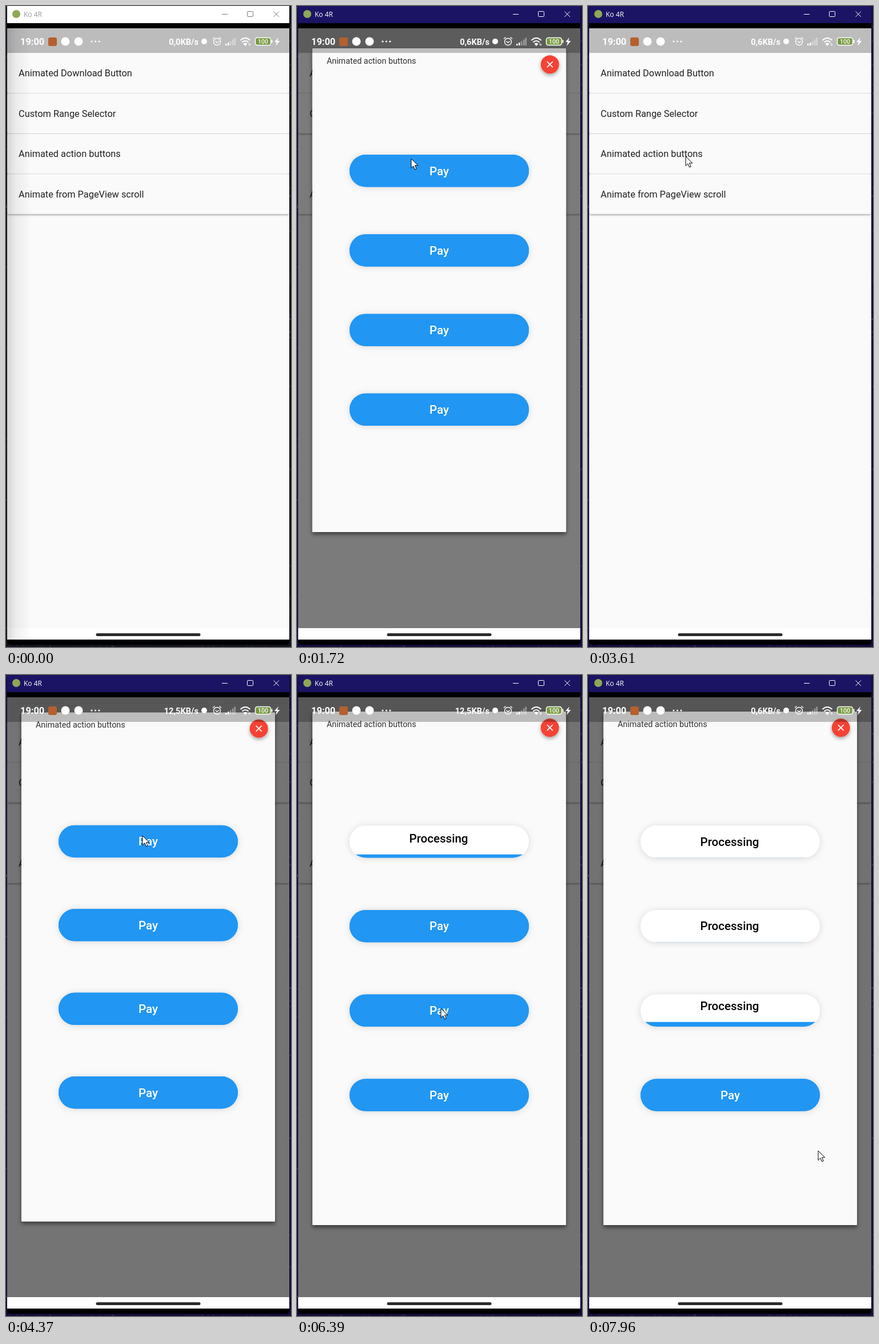
Animation of 499x1121 px, one loop 8000 ms. Source, as an HTML page:

```html
<!DOCTYPE html>
<html lang="en">
<head>
<meta charset="utf-8">
<title>Animated action buttons</title>
<style>
html, body { margin: 0; width: 100%; height: 100%; overflow: hidden; background: #0b0d16; }
svg { display: block; width: 499px; height: 1121px; }
text { font-family: Roboto, sans-serif; white-space: pre; }
.item { font-size: 16.34px; fill: #212121; }
.label { font-size: 20.5px; font-weight: 500; text-anchor: middle; }
</style>
</head>
<body>
<svg id="stage" viewBox="0 0 499 1121" xmlns="http://www.w3.org/2000/svg">
  <defs>
    <filter id="cardShadow" x="-5%" y="-30%" width="110%" height="170%">
      <feDropShadow dx="0" dy="2" stdDeviation="1.8" flood-color="#000" flood-opacity=".32"/>
    </filter>
    <filter id="panelShadow" x="-10%" y="-10%" width="120%" height="130%">
      <feDropShadow dx="0" dy="4" stdDeviation="3.5" flood-color="#000" flood-opacity=".5"/>
    </filter>
    <filter id="pillShadow" x="-15%" y="-50%" width="130%" height="200%">
      <feDropShadow dx="0" dy="1" stdDeviation="6" flood-color="#000" flood-opacity=".14"/>
    </filter>
    <filter id="fabShadow" x="-50%" y="-50%" width="200%" height="220%">
      <feDropShadow dx="0" dy="3" stdDeviation="3" flood-color="#000" flood-opacity=".35"/>
    </filter>
    <linearGradient id="edge">
      <stop offset="0" stop-color="#000" stop-opacity=".15"/>
      <stop offset=".35" stop-color="#000" stop-opacity=".06"/>
      <stop offset="1" stop-color="#000" stop-opacity="0"/>
    </linearGradient>
    <clipPath id="screen"><rect x="2" y="39" width="494" height="1069"/></clipPath>
    <clipPath id="panelClip"><rect id="panelCut"/></clipPath>
  </defs>

  <rect id="desk" width="499" height="1121"/>
  <g id="specks"></g>
  <path d="M2 0H496V1111q0 6-6 6H8q-6 0-6-6Z" fill="#000"/>

  <rect id="bar" x="2" y="0" width="494" height="30"/>
  <circle cx="18" cy="14" r="7" fill="#8fa854"/>
  <text id="barText" x="31" y="18.5" style="font:12px 'Open Sans',sans-serif">Ko 4R</text>
  <path id="barIcons" d="M378 14.5H388M423.5 9.5h8q1 0 1 1v7q0 1-1 1h-8q-1 0-1-1v-7q0-1 1-1ZM468.5 9.5l9.5 9.5m0-9.5l-9.5 9.5" fill="none"/>

  <g clip-path="url(#screen)">
    <rect x="2" y="39" width="494" height="1049" fill="#fafafa"/>
    <g id="cards"></g>
    <rect id="scrim" x="2" y="39" width="494" height="1049" fill="#000"/>
    <g id="panel">
      <rect id="panelBox" fill="#fafafa" filter="url(#panelShadow)"/>
      <g clip-path="url(#panelClip)">
        <text id="cardTitle" class="item">Animated action buttons</text>
        <g id="form">
          <text id="formTitle" style="font-size:14.32px" fill="#303030">Animated action buttons</text>
          <g id="pills"></g>
          <g id="close">
            <circle r="16" fill="#f44336" filter="url(#fabShadow)"/>
            <path d="M-5-5L5 5M5-5L-5 5" stroke="#fff" stroke-width="1.7"/>
          </g>
        </g>
      </g>
    </g>
    <rect x="2" y="1088" width="494" height="20" fill="#fff"/>
    <rect x="157.500" y="1097" width="183" height="5" rx="2.500" fill="#2c2c2c"/>
    <rect id="edgeShade" x="2" y="39" width="43" height="1069" fill="url(#edge)"/>

    <rect x="2" y="39" width="494" height="43" fill="#000" fill-opacity=".25"/>
    <g fill="#fff">
      <text x="25" y="68" font-size="16.4" font-weight="700">19:00</text>
      <rect x="74" y="55" width="15" height="15" rx="3" fill="#b5602f"/>
      <circle cx="104" cy="62" r="7.500"/>
      <circle cx="127" cy="62" r="7.500"/>
      <circle cx="150" cy="62" r="1.600"/><circle cx="156.500" cy="62" r="1.600"/><circle cx="163" cy="62" r="1.600"/>
      <text id="speed" x="337" y="67.500" font-size="14.6" font-weight="700" text-anchor="end"></text>
      <circle cx="347" cy="62" r="5"/>
      <g fill="none" stroke="#fff" stroke-width="1.400">
        <circle cx="369.500" cy="62.500" r="6"/>
        <path d="M366.500 61.500l3 2.500l3.500-2.500M362 57.500l3.500-3M377 57.500l-3.500-3"/>
      </g>
      <path d="M384 66h2.500v3H384ZM388 64h2.500v5H388Z"/>
      <path d="M392 61.500h2.500v7.500H392ZM396 58.500h2.500v10.500H396ZM399.500 55.500h2.500v13.500h-2.500Z" opacity=".4"/>
      <g fill="none" stroke="#fff" stroke-width="2">
        <path d="M410.500 60q8.500-8 17 0M413.500 63.500q5.500-5 11 0"/>
      </g>
      <path d="M415.500 66q3.500-3 7 0l-3.500 4ZM425 65h1v4h-1ZM427 66h1v3h-1Z"/>
      <rect x="436.500" y="55.500" width="27" height="13" rx="3.500" fill="#76983f" stroke="#fff" stroke-width="1.500"/>
      <path d="M464.500 59.500h2v5h-2Z"/>
      <text x="450" y="66" font-size="10.500" font-weight="500" text-anchor="middle">100</text>
      <path d="M477 55l-7 8h4l-2 7l7.500-9h-4.500Z"/>
    </g>
  </g>
  <path id="cursor" d="M0 0V16.500L3.800 12.800L6.600 19L9.200 17.900L6.500 11.800H11.700Z" fill="#fff" stroke="#000" stroke-width="1"/>
</svg>
<script>
const LOOP = 8000, FLIGHT = 500, SLIDE = 500;
const ACTIVE_AT = 1250;
const FLIGHTS = [[1372, 'open'], [2880, 'close'], [3935, 'open']];
const PRESSES = [5943, 6900, 7535, Infinity];
const SPEEDS = [[0, '0,0KB/s'], [1400, '0,6KB/s'], [3980, '12,5KB/s'], [7250, '0,6KB/s']];
const CARD = { l: 2, t: 223, r: 496, b: 294 };
const FORM = { l: 27, t: 64, r: 471, b: 962 };
const PILL_H = 56.5;

// time, x, y of the pointer tip
const PATH = [
  [580, 502, 520], [1000, 232, 300], [1250, 200, 267], [1760, 200, 267],
  [2250, 310, 190], [2700, 437, 104], [2900, 438, 106], [3060, 427, 165],
  [3480, 171, 263], [3960, 171, 263], [4370, 239, 281], [5950, 243, 289],
  [6150, 248, 450], [6390, 252, 583], [6560, 252, 583], [6820, 252, 440],
  [6960, 252, 440], [7320, 253, 585], [7560, 254, 588], [7680, 264, 638],
  [7840, 375, 765], [7960, 403, 832], [8000, 405, 836]
];

const $ = id => document.getElementById(id);
const clamp = v => Math.min(1, Math.max(0, v));
const mix = (a, b, p) => a + (b - a) * p;
const last = (list, t) => list.filter(e => e[0] <= t).pop();

function make(parent, tag, attrs, content) {
  const el = document.createElementNS('http://www.w3.org/2000/svg', tag);
  if (content) el.textContent = content;
  parent.appendChild(el);
  return set(el, attrs);
}

function set(el, attrs) {
  for (const k in attrs) el.setAttribute(k, attrs[k]);
  return el;
}

function bezier(x1, y1, x2, y2) {
  const at = (a, b, s) => 3 * a * s * (1 - s) ** 2 + 3 * b * s * s * (1 - s) + s ** 3;
  return x => {
    if (x <= 0 || x >= 1) return clamp(x);
    let lo = 0, hi = 1;
    for (let i = 0; i < 24; i++) {
      const m = (lo + hi) / 2;
      if (at(x1, x2, m) < x) lo = m; else hi = m;
    }
    return at(y1, y2, lo);
  };
}
const ease = bezier(.25, .1, .25, 1);
const fastOut = bezier(.4, 0, .2, 1);

const cards = ['Animated Download Button', 'Custom Range Selector',
  'Animated action buttons', 'Animate from PageView scroll'].map((name, i) => {
  const y = 82 + i * 70.5;
  const g = make($('cards'), 'g', {});
  make(g, 'rect', { x: 2, y: y + .5, width: 494, height: 69.7, rx: 4, fill: '#fafafa', filter: 'url(#cardShadow)' });
  make(g, 'text', { class: 'item', x: 22, y: y + 41.4 }, name);
  return g;
});

const pills = PRESSES.map((press, i) => {
  const g = make($('pills'), 'g', {});
  const cut = make(make(g, 'clipPath', { id: 'pill' + i }), 'rect', {});
  const base = make(g, 'rect', { fill: '#fff', filter: 'url(#pillShadow)' });
  const inner = make(g, 'g', { 'clip-path': `url(#pill${i})` });
  const blue = make(inner, 'rect', { fill: '#2196f3' });
  const pay = make(inner, 'text', { class: 'label', fill: '#fff' }, 'Pay');
  const busy = make(inner, 'text', { class: 'label', fill: '#000' }, 'Processing');
  return { press, g, cut, base, blue, pay, busy };
});

let seed = 7;
const rnd = () => (seed = seed * 16807 % 2147483647) / 2147483647;
for (let i = 0; i < 70; i++) {
  const side = rnd(), y = rnd() * 1121;
  if (side < .7) make($('specks'), 'rect', { x: side < .35 ? 0 : 497, y, width: 1, height: 1 + rnd() * 2, fill: '#8b8ba5', opacity: .2 + rnd() * .5 });
  else make($('specks'), 'rect', { x: rnd() * 499, y: 1118 + rnd() * 2, width: 2, height: 1, fill: '#8b8ba5', opacity: .3 });
}

function flight(t) {
  const [start, kind] = last(FLIGHTS, t) || [0, ''];
  const p = clamp((t - start) / FLIGHT);
  if (!kind || (kind === 'close' && p === 1)) return { shown: false, dim: 0 };
  const k = fastOut(p);
  return kind === 'open'
    ? { shown: true, dim: ease(p), y: k, x: 1 - (1 - k) ** 2, form: true }
    : { shown: true, dim: ease(1 - p), y: 1 - k, x: (1 - k) ** 2, form: false };
}

function drawPanel(f, t) {
  const l = mix(CARD.l, FORM.l, f.x), r = mix(CARD.r, FORM.r, f.x);
  const top = mix(CARD.t, FORM.t, f.y), b = mix(CARD.b, FORM.b, f.y);
  const box = { x: l, y: top, width: r - l, height: b - top, rx: f.form ? 1 : 4 };
  set($('panelBox'), box);
  set($('panelCut'), box);
  $('form').style.display = f.form ? '' : 'none';
  $('cardTitle').style.display = f.form ? 'none' : '';
  set($('cardTitle'), { x: l + 20, y: top + 40.5 });
  set($('formTitle'), { x: l + 25, y: top + 26.7 });
  set($('close'), { transform: `translate(${r - 28.3} ${top + 28.2})` });

  const step = box.height * .1645, h = Math.min(PILL_H, step), w = box.width - 130;
  pills.forEach((p, i) => {
    const cy = (top + b) / 2 + (i - 1.5) * step;
    const slide = clamp((t - p.press) / SLIDE) * h;
    const shape = { width: w, height: h, rx: h / 2 };
    set(p.g, { transform: `translate(${l + 65} ${cy - h / 2})` });
    set(p.cut, shape);
    set(p.base, { ...shape, fill: slide > 0 ? '#fff' : '#2196f3' });
    set(p.blue, { y: slide, width: w, height: h });
    set(p.pay, { x: w / 2, y: h / 2 + 7.3 + slide });
    set(p.busy, { x: w / 2 - 1, y: h / 2 + 7.3 + slide - h });
  });
}

function drawCursor(t) {
  const i = PATH.findIndex(p => p[0] > t);
  $('cursor').style.display = i > 0 ? '' : 'none';
  if (i < 1) return;
  const [t0, x0, y0] = PATH[i - 1], [t1, x1, y1] = PATH[i];
  const p = (t - t0) / (t1 - t0), k = p * p * (3 - 2 * p);
  set($('cursor'), { transform: `translate(${mix(x0, x1, k)} ${mix(y0, y1, k)})` });
}

function draw(t) {
  const active = t >= ACTIVE_AT;
  set($('desk'), { fill: active ? '#120d3a' : '#11131d' });
  set($('bar'), { fill: active ? '#1b1464' : '#fff' });
  set($('barText'), { fill: active ? '#fff' : '#999' });
  set($('barIcons'), { stroke: active ? '#fff' : '#777' });
  $('edgeShade').style.display = active ? 'none' : '';
  $('speed').textContent = last(SPEEDS, t)[1];

  const f = flight(t);
  set($('scrim'), { 'fill-opacity': .54 * f.dim });
  cards[2].style.display = f.shown ? 'none' : '';
  $('panel').style.display = f.shown ? '' : 'none';
  if (f.shown) drawPanel(f, t);
  drawCursor(t);
}

const began = performance.now();
function tick() {
  draw((performance.now() - began) % LOOP);
  requestAnimationFrame(tick);
}
tick();
</script>
</body>
</html>
```
